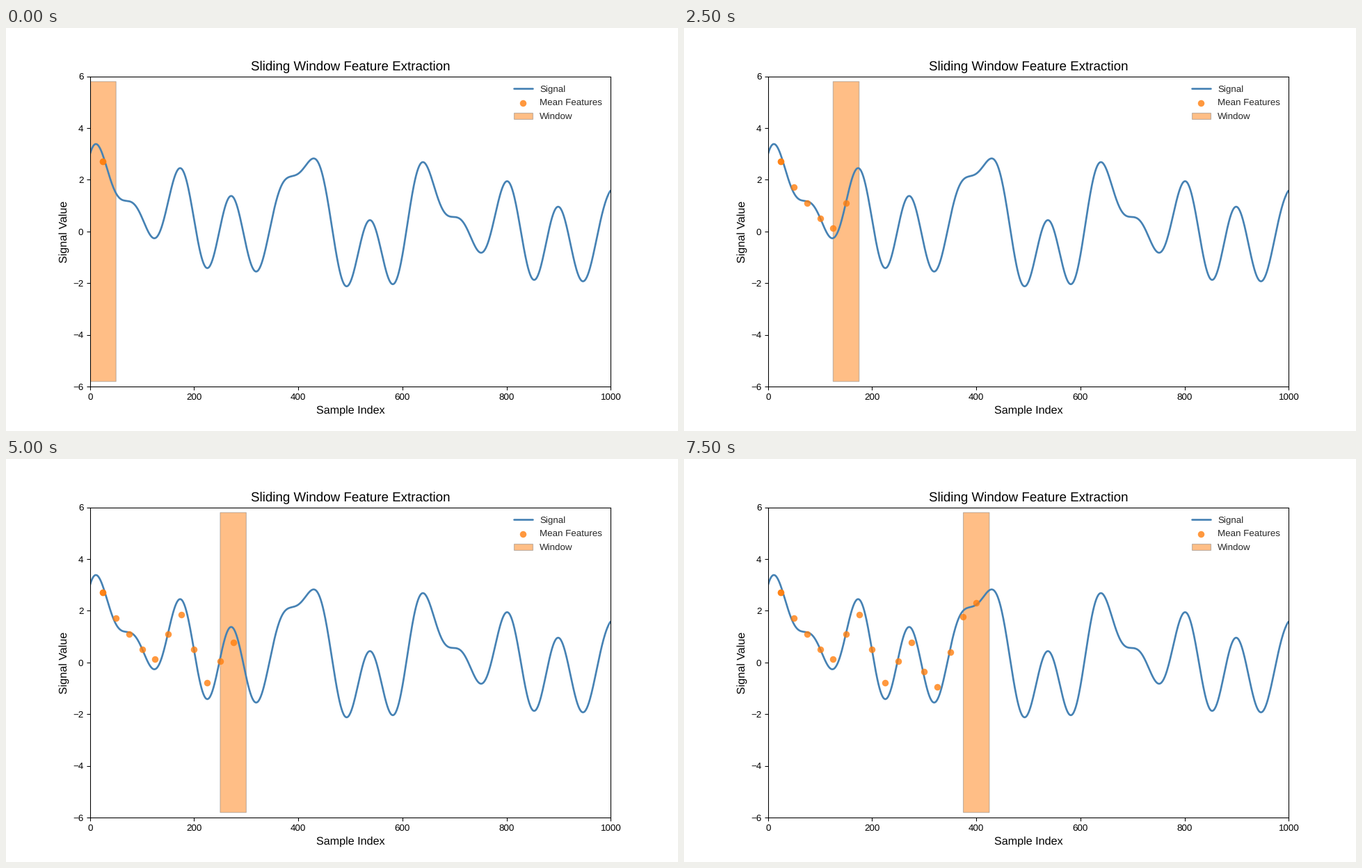
Write a matplotlib script that moves like this. It is 966 px wide and 580 px high and loops after 8 s.

```python
import numpy as np
import matplotlib.pyplot as plt
from matplotlib.animation import FuncAnimation
from matplotlib.patches import Rectangle

SAMPLES, WIDTH, STEP, FRAMES = 1000, 50, 25, 16
K = 0.966  # point scale: a 10 x 6 inch layout on a 966 x 580 stage
ORANGE = "#ff7f0e"

plt.rcParams.update({
    "font.family": "Liberation Sans",
    "font.size": 10 * K,
    "text.hinting": "none",
    "axes.linewidth": 0.8 * K,
    "axes.titlesize": 14 * K,
    "axes.titlepad": 6 * K,
    "axes.labelsize": 12 * K,
    "axes.labelpad": 4 * K,
    "lines.solid_capstyle": "round",
})
for axis in ("xtick", "ytick"):
    plt.rcParams.update({
        f"{axis}.labelsize": 10 * K,
        f"{axis}.major.size": 3.5 * K,
        f"{axis}.major.width": 0.8 * K,
        f"{axis}.major.pad": 3.5 * K,
    })

t = np.linspace(0, 100, SAMPLES)
signal = (np.exp(-t / 50) + np.sin(0.2 * t) + np.cos(0.3 * t)
          + np.sin(0.5 * t) + np.cos(0.7 * t))

starts = np.arange(FRAMES) * STEP
means = [signal[s:s + WIDTH].mean() for s in starts]
points = np.column_stack([starts + WIDTH / 2, means])
# The opening feature is stamped twice, so it looks denser.
points = np.vstack([points[:1], points])

fig, ax = plt.subplots(figsize=(9.66, 5.8), dpi=100)
ax.plot(signal, color="steelblue", lw=2 * K, label="Signal")
dots = ax.scatter([], [], s=50 * K**2, color=ORANGE, alpha=0.8,
                  linewidths=0, zorder=3, label="Mean Features")
window = ax.add_patch(Rectangle((0, -5.8), WIDTH, 11.6, facecolor=ORANGE,
                                edgecolor="gray", alpha=0.5, lw=0.8 * K,
                                snap=False, label="Window"))

ax.set(xlim=(0, SAMPLES), ylim=(-6, 6), xlabel="Sample Index",
       ylabel="Signal Value", title="Sliding Window Feature Extraction")
ax.legend(loc="upper right", bbox_to_anchor=(1, 0.998), frameon=False,
          labelcolor="#262626", labelspacing=0.56, scatterpoints=1)


def update(i):
    window.set_x(starts[i])
    dots.set_offsets(points[:i + 2])
    return window, dots


anim = FuncAnimation(fig, update, frames=FRAMES, interval=500,
                     init_func=lambda: update(0), repeat=True, repeat_delay=0)
plt.show()
```
